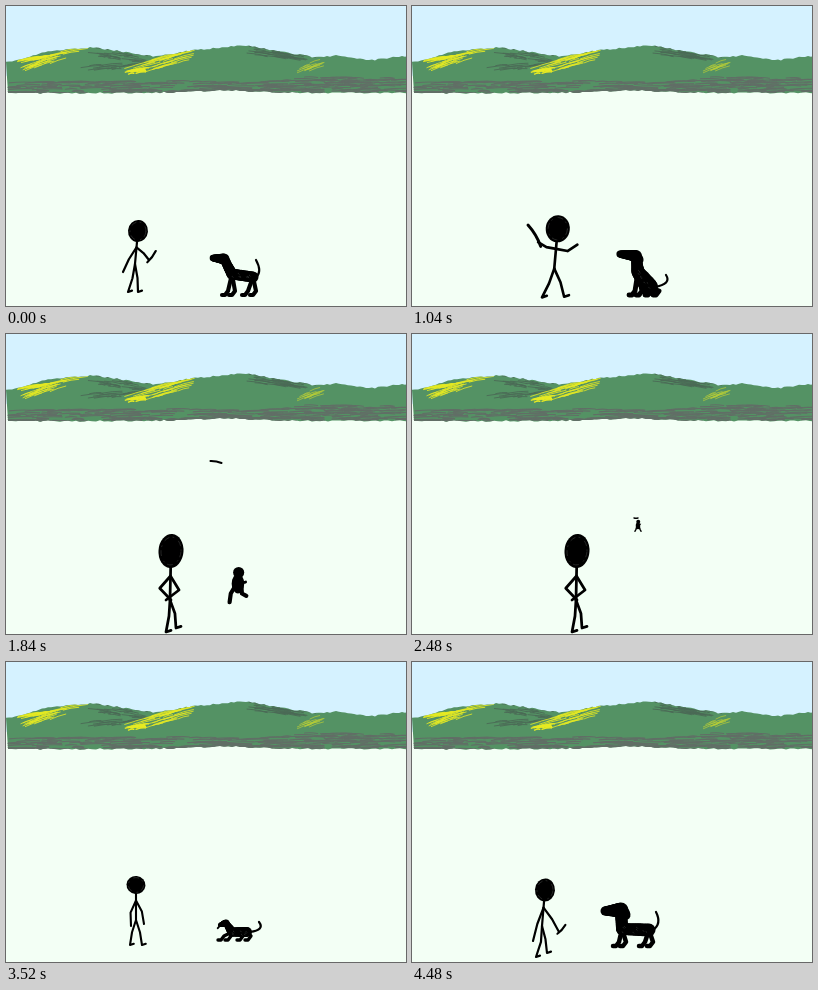
These frames come from a looping animation (400x300 px, 4.56 s). An HTML page with a canvas:

```html
<!DOCTYPE html>
<html lang="en">
<head>
<meta charset="utf-8">
<title>Fetch</title>
<style>
html, body { margin: 0; width: 100%; height: 100%; overflow: hidden; background: #f3fff5; }
canvas { display: block; width: 100vw; height: 100vh; }
</style>
</head>
<body>
<canvas id="stage" width="400" height="300"></canvas>
<script>
const LOOP = 4560, STEP = 80, INK = '#000';
const LEAVE = 1760, RETURN = 3440, RELEASE = 1440, LAND = 2240;
const ctx = document.getElementById('stage').getContext('2d');

// ---------- helpers ----------
function seeded(seed) {
  return () => (seed = (seed * 16807) % 2147483647) / 2147483647;
}
const clamp = k => Math.min(1, Math.max(0, k));
const mix = (a, b, k) => a.map((v, i) => v + (b[i] - v) * k);

// keys: [position, value] rows; finds the two neighbours and the share between them
function between(keys, t) {
  let i = 0;
  while (i < keys.length - 2 && t >= keys[i + 1][0]) i++;
  const [t0, a] = keys[i], [t1, b] = keys[i + 1];
  return [a, b, clamp((t - t0) / (t1 - t0))];
}
function poseAt(keys, t) {
  const [a, b, k] = between(keys, t), pose = {};
  for (const part in a) pose[part] = mix(a[part], b[part], k);
  return pose;
}
function line(points, width, color = INK, g = ctx) {
  g.beginPath();
  for (const [x, y] of points) g.lineTo(x, y);
  g.strokeStyle = color;
  g.lineWidth = width;
  g.stroke();
}
function curve(a, c, b, width, color = INK, g = ctx) {
  g.beginPath();
  g.moveTo(...a);
  g.quadraticCurveTo(...c, ...b);
  g.strokeStyle = color;
  g.lineWidth = width;
  g.stroke();
}
function oval([x, y], rx, ry, turn = 0) {
  ctx.beginPath();
  ctx.ellipse(x, y, rx, ry, turn, 0, 7);
  ctx.fill();
}
// tapered limb from a to b
function blob(a, ra, b, rb) {
  for (let k = 0; k <= 1; k += 0.0625) {
    const r = ra + (rb - ra) * k;
    oval(mix(a, b, k), r, r);
  }
}

// ---------- landscape ----------
const ridge = [[0, 57], [45, 45.5], [88, 42], [148, 51], [190, 44.5], [240, 40], [308, 52],
  [332, 50], [364, 55], [400, 50.5]];

function paintScene() {
  const c = document.createElement('canvas');
  c.width = 400; c.height = 300;
  const g = c.getContext('2d'), rnd = seeded(41);
  g.lineCap = 'round';

  const top = x => { const [a, b, k] = between(ridge, x); return a + (b - a) * k - 0.6; };
  const foot = x => 87 - 2.5 * Math.exp(-(((x - 220) / 50) ** 2));

  g.fillStyle = '#f3fff5';
  g.fillRect(0, 0, 400, 300);
  g.fillStyle = '#d5f2ff';
  g.fillRect(0, 0, 400, 70);
  g.beginPath();
  for (let x = 0; x <= 402; x += 3) g.lineTo(x, top(x) + rnd() * 1.4 - 0.7);
  for (let x = 402; x >= 0; x -= 4) g.lineTo(x, foot(x) + rnd() * 1.4 - 0.7);
  g.fillStyle = '#549264';
  g.fill();
  g.save();
  g.clip();

  // bowed brush marks scattered around the line from a to b
  function brush(n, color, a, b, spread, len, slope, width) {
    for (let i = 0; i < n; i++) {
      const [x, y] = mix(a, b, rnd()), dy = (rnd() - 0.5) * spread;
      const l = len * (0.3 + rnd()) / 2;
      curve([x - l, y + dy - l * slope], [x, y + dy - 1], [x + l, y + dy + l * slope],
        width, color, g);
    }
  }
  const grey = '#616e66', dark = '#4b6a56', yellow = '#e6ea22';
  brush(170, grey, [0, 81], [400, 79], 11, 24, -0.03, 1.1);
  brush(60, grey, [0, 86], [400, 85], 3, 24, 0, 1.4);
  brush(30, grey, [300, 75], [400, 76], 8, 22, 0.03, 1.1);
  brush(24, dark, [92, 46], [142, 54], 9, 18, 0.15, 0.9);
  brush(30, dark, [250, 45], [305, 53], 8, 20, 0.15, 0.9);
  brush(14, dark, [85, 62], [130, 60], 6, 18, -0.1, 0.9);
  brush(20, yellow, [14, 55], [68, 45], 4, 24, -0.18, 0.9);
  brush(18, yellow, [12, 63], [52, 52], 6, 22, -0.35, 0.8);
  brush(30, yellow, [132, 62], [180, 50], 11, 24, -0.28, 0.8);
  brush(16, yellow, [124, 66], [142, 64], 4, 10, -0.15, 1.3);
  brush(14, '#b9cf35', [296, 62], [318, 57], 8, 13, -0.35, 0.7);
  g.restore();
  return c;
}

// ---------- man ----------
// limbs: end x, end y, sideways bend of the joint; stick: length, angle in degrees
const stand = { head: [132,225], size: [10,11], hip: [129,258], armL: [117,266,-1],
  armR: [143,254,1], legL: [122,286,1], legR: [132,286,1], stick: [14,-53] };
const ready = { head: [142,224], size: [10.5,13], hip: [136,262], armL: [161,233,-5],
  armR: [153,253,-2], legL: [125,287,1], legR: [139,287,2], stick: [16,-72] };
const reach = { head: [148,222], size: [13,14], hip: [146,263], armL: [168,242,-4],
  armR: [110,226,4], legL: [133,294,1], legR: [160,293,1], stick: [30,-150] };
const hurl = { head: [170,221], size: [15,16], hip: [166,262], armL: [185,271,-16],
  armR: [179,182,15], legL: [147,295,5], legR: [171,293,4], stick: [33,-153] };
const wait = { head: [165,217], size: [12.5,17], hip: [164,266], armL: [165,266,-11],
  armR: [160,266,11], legL: [160,298,1], legR: [170,294,2], stick: [0,0] };
const relax = { head: [130,223], size: [9.5,9], hip: [130,258], armL: [125,264,-3],
  armR: [138,262,2], legL: [124,283,-1], legR: [136,283,1], stick: [0,0] };
const bend = { head: [157,246], size: [10,7], hip: [141,263], armL: [134,259,-2],
  armR: [167,268,-3], legL: [125,281,3], legR: [140,280,8], stick: [8,-14] };
const pick = { ...bend, armR: [170,284,-3] };
const rise = { head: [133,228], size: [10,11.5], hip: [130,264], armL: [121,279,-1],
  armR: [147,270,1], legL: [124,295,2], legR: [135,291,1], stick: [12,-48] };

const manKeys = [[0, stand], [640, ready], [1280, reach], [1440, hurl], [1840, wait],
  [2800, wait], [3440, relax], [3840, relax], [4080, bend], [4240, pick], [4480, rise],
  [LOOP, stand]];

function manAt(t) {
  const m = poseAt(manKeys, t);
  if (t > 2800 && t < RETURN) {
    const swing = 5 * Math.sin((t - 2800) / 320 * 2 * Math.PI);
    m.legL[0] += swing;
    m.legR[0] -= swing;
  }
  return m;
}
function limb(from, [x, y, bow], width, toe = 0) {
  const dx = x - from[0], dy = y - from[1], d = Math.hypot(dx, dy) || 1;
  const joint = [from[0] + dx / 2 + dy / d * bow, from[1] + dy / 2 - dx / d * bow];
  line([from, joint, [x, y], [x + toe, y - toe / 3]], width);
}
function drawMan(m) {
  const { head, size: [rx, ry], hip } = m, width = rx * 0.22;
  const reachHip = Math.hypot(hip[0] - head[0], hip[1] - head[1]);
  const neck = mix(head, hip, ry / reachHip), shoulder = mix(neck, hip, 0.25);
  line([head, neck, hip], width);
  limb(shoulder, m.armL, width);
  limb(shoulder, m.armR, width);
  limb(hip, m.legL, width, rx * 0.4);
  limb(hip, m.legR, width, rx * 0.4);
  ctx.fillStyle = INK;
  oval(head, rx, ry, 0.08);
  // pencil gap inside the head
  ctx.beginPath();
  ctx.ellipse(...head, rx * 0.8, ry * 0.82, 0.1, 0, 7);
  ctx.setLineDash([5, 4, 1, 6]);
  ctx.strokeStyle = '#4a4d4b';
  ctx.lineWidth = 0.5;
  ctx.stroke();
  ctx.setLineDash([]);
}

// ---------- dog, side view ----------
// girth: radius of head, chest, rump; paws: front x, hind x, ground
const dogStand = { nose: [207,252], head: [218,253], chest: [226,268], rump: [247,271],
  tail: [250,254], girth: [5.5,5.5,5.5], paws: [216,236,291] };
const dogSit = { nose: [208,248], head: [224,250], chest: [226,266], rump: [237,281],
  tail: [252,269], girth: [6,6.5,9], paws: [217,233,291] };
const dogFetch = { nose: [214,263], head: [220,261], chest: [226,270], rump: [241,270],
  tail: [253,260], girth: [3.5,4.5,5], paws: [212,231,280] };
const dogDrop = { nose: [193,257], head: [206,252], chest: [210,266], rump: [237,270],
  tail: [251,257], girth: [5,6,6], paws: [201,228,286] };
const dogBegin = { nose: [193,249], head: [209,248], chest: [210,267], rump: [237,268],
  tail: [244,250], girth: [7.5,6,6.5], paws: [201,227,286] };

const dogKeys = [[0, dogStand], [160, dogStand], [640, dogSit], [RETURN, dogSit],
  [RETURN, dogFetch], [3520, dogFetch], [3920, dogDrop], [4080, dogDrop], [4480, dogBegin],
  [LOOP, dogStand]];

function dogAt(t) {
  const d = poseAt(dogKeys, t);
  if (t > 640 && t < LEAVE) d.tail[0] += 2 * Math.sin(t / 320 * 2 * Math.PI);
  if (t > 3520 && t < 3920) {
    const trot = 4 * Math.sin((t - 3520) / 200 * Math.PI);
    d.paws[0] += trot;
    d.paws[1] -= trot;
  }
  return d;
}
function drawDog(d, t) {
  const { nose, head, chest, rump, tail, girth: [r, rc, rr], paws: [front, hind, ground] } = d;
  ctx.fillStyle = INK;
  blob(nose, r * 0.6, head, r);
  blob(head, r * 0.8, chest, rc);
  blob(chest, rc, rump, rr);
  oval([head[0] + r * 0.6, head[1] + r * 0.4], r * 0.6, r * 0.9, -0.4);
  const legs = [[chest, front], [chest, front + 7], [rump, hind], [rump, hind + 8]];
  for (const [from, x] of legs)
    line([from, [x + 6, ground - 6], [x + 3, ground - 2], [x, ground - 2]], rc * 0.75);
  const base = [rump[0] + rr * 0.6, rump[1]];
  curve(base, [Math.max(base[0], tail[0]) + 6, (base[1] + tail[1]) / 2 + 3], tail, 2.2);
  // specks of paper in the fur
  const rnd = seeded(t + 7);
  for (let i = 0; i < 8; i++) {
    const [x, y] = mix(chest, rump, rnd()), dy = (rnd() - 0.5) * rc;
    line([[x, y + dy], [x + 1, y + dy + 1]], 0.4, '#5a5d5b');
  }
}

// ---------- dog, running off and back ----------
function runnerAt(t) {
  const far = clamp(Math.min((t - LEAVE) / 720, (RETURN - t) / 800));
  const near = (1 - far) ** 2.5;
  return { x: 226 + 8 * near, y: 191 + 76 * near, scale: 0.25 + 0.6 * near };
}
function drawRunner({ x, y, scale }, t) {
  const beat = 5 * Math.sin((t - 2480) / 190 * Math.PI);
  ctx.save();
  ctx.translate(x, y);
  ctx.scale(scale, scale);
  ctx.fillStyle = INK;
  oval([1, -13], 8, 8);
  oval([0, 3], 9, 14);
  for (const side of [-1, 1])
    line([[5 * side, 8], [8 * side - beat / 2, 17], [12 * side, 25 - side * beat]], 6);
  line([[4, 2], [11, -4 + beat]], 4);
  ctx.restore();
}

// ---------- stick ----------
function drawBar([x, y], len, degrees, grip) {
  const a = degrees * Math.PI / 180, ux = Math.cos(a) * len, uy = Math.sin(a) * len;
  const p = k => [x + ux * k, y + uy * k];
  const mid = p(0.5 - grip);
  curve(p(-grip), [mid[0] - uy * 0.1, mid[1] + ux * 0.1], p(1 - grip),
    Math.min(3.4, 1.2 + len / 14));
}
function drawStick(t, man, dog, runner) {
  if (t <= RELEASE || t >= 4240) {
    drawBar(man.armR, ...man.stick, t > 1200 && t <= RELEASE ? 0 : 0.2);
  } else if (t < 2560) {
    const k = clamp((t - RELEASE) / (LAND - RELEASE)), fade = 1 - (1 - k) ** 2;
    const x = 168 + 56 * fade, y = 176 + 8 * k - 4 * 52 * k * (1 - k);
    drawBar([x, y], 4 + 29 * (1 - k) ** 2, 380 * (1 - k), 0.5);
  } else if (t < RETURN) {
    const { x, y, scale } = runner;
    drawBar([x, y - 10 * scale], 4 + 12 * (scale - 0.25), 5, 0.5);
  } else {
    const drop = clamp((t - 3840) / 160);
    drawBar(mix(dog.nose, [173, 283], drop), 8, -54 + 40 * drop, 0.5);
  }
}

// ---------- loop ----------
const scene = paintScene();
ctx.lineCap = ctx.lineJoin = 'round';
const start = performance.now();

function draw() {
  const t = Math.floor((performance.now() - start) % LOOP / STEP) * STEP;
  const man = manAt(t), dog = dogAt(t), runner = runnerAt(t);
  ctx.drawImage(scene, 0, 0);
  if (t >= LEAVE && t < RETURN) drawRunner(runner, t); else drawDog(dog, t);
  drawMan(man);
  drawStick(t, man, dog, runner);
  requestAnimationFrame(draw);
}
draw();
</script>
</body>
</html>
```
